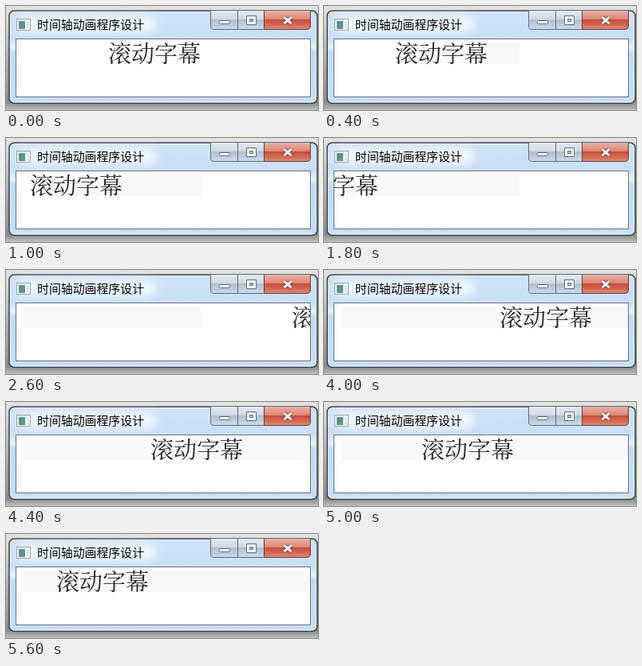
These frames come from a looping animation (391x131 px, 5.8 s). An HTML page:

```html
<!DOCTYPE html>
<html lang="zh-CN">
<head>
<meta charset="utf-8">
<style>
  html, body { margin: 0; width: 100%; height: 100%; overflow: hidden; background: #a9a9a9; }
  svg { display: block; width: 391px; height: 131px; }
  text { font-family: "Noto Sans CJK SC", "Noto Sans CJK", sans-serif; }
  #caption { font-family: "Noto Serif CJK SC", "Noto Sans CJK SC", "Noto Sans CJK", serif; font-weight: 200; }
</style>
</head>
<body>
<svg viewBox="0 0 391 131">
  <defs>
    <linearGradient id="shadow" x2="0" y2="1">
      <stop offset="0" stop-color="#e2e2e2"/>
      <stop offset=".3" stop-color="#c6c6c6"/>
      <stop offset=".93" stop-color="#8a8a8a"/>
      <stop offset="1" stop-color="#c0c0c0"/>
    </linearGradient>
    <linearGradient id="glass" x2="0" y2="1">
      <stop offset="0" stop-color="#cfe2f8"/>
      <stop offset=".3" stop-color="#c9dff8"/>
      <stop offset=".4" stop-color="#e6f1fc"/>
      <stop offset=".45" stop-color="#c2dcf8"/>
      <stop offset="1" stop-color="#c8e0fa"/>
    </linearGradient>
    <linearGradient id="button" x2="0" y2="1">
      <stop offset="0" stop-color="#e4ebf3"/>
      <stop offset=".45" stop-color="#ced8e4"/>
      <stop offset=".48" stop-color="#b0bfd0"/>
      <stop offset="1" stop-color="#cbdbec"/>
    </linearGradient>
    <linearGradient id="close" x2="0" y2="1">
      <stop offset="0" stop-color="#ecb3a8"/>
      <stop offset=".45" stop-color="#dc8473"/>
      <stop offset=".48" stop-color="#c64a35"/>
      <stop offset="1" stop-color="#dc8a74"/>
    </linearGradient>
    <linearGradient id="teal" x2="1" y2="1">
      <stop offset="0" stop-color="#5486a0"/>
      <stop offset="1" stop-color="#5fa085"/>
    </linearGradient>
    <filter id="soft" x="-20%" y="-60%" width="140%" height="220%"><feGaussianBlur stdDeviation="6"/></filter>
    <clipPath id="client"><path d="M13 42H381V114H13Z"/></clipPath>
  </defs>

  <rect width="391" height="131" fill="url(#shadow)"/>
  <rect x="4" y="6" width="386" height="116.5" rx="6.5" fill="url(#glass)" stroke="#36424e" stroke-width="1.5"/>
  <rect x="5.5" y="7.5" width="383" height="113.5" rx="5" fill="none" stroke="#f3f9ff" stroke-opacity=".85"/>
  <rect x="14" y="13" width="174" height="20" rx="8" fill="#fff" opacity=".75" filter="url(#soft)"/>

  <rect x="13.5" y="16.5" width="17" height="14" fill="#f4f6f7" stroke="#98a2a8"/>
  <rect x="16" y="19" width="8" height="10" fill="url(#teal)"/>
  <path d="M26 20.5H29M26 23.5H29M26 26.5H29" stroke="#c5ced2"/>
  <text x="39" y="28.5" font-size="14.9" fill="#000">时间轴动画程序设计</text>

  <g stroke="#5d6977">
    <path d="M256.5 6V25Q256.5 29.5 261 29.5H290.5V6" fill="url(#button)"/>
    <path d="M290.5 6V29.5H323.5V6" fill="url(#button)"/>
    <path d="M323.5 6V29.5H377Q381.5 29.5 381.5 25V6" fill="url(#close)" stroke="#633a36"/>
  </g>
  <g fill="#fff" stroke="#5d6773">
    <rect x="267.5" y="18.5" width="13" height="4" rx="1"/>
    <path fill-rule="evenodd" d="M301.5 12.5H313.5V23.5H301.5ZM305.5 16.5H309.5V19.5H305.5Z"/>
  </g>
  <g fill="none">
    <path d="M348.5 14L357.5 22M357.5 14L348.5 22" stroke="#6e4a4a" stroke-width="5"/>
    <path d="M348.5 14L357.5 22M357.5 14L348.5 22" stroke="#fff" stroke-width="3"/>
  </g>

  <rect x="12.5" y="41.5" width="369" height="73" fill="#fff" stroke="#68737e"/>
  <g clip-path="url(#client)">
    <g fill="#f9f9f9">
      <rect id="leftTrail" y="46" height="27"/>
      <rect id="rightTrail" y="46" height="27"/>
    </g>
    <text id="caption" y="71" font-size="29" fill="#262626">滚动字幕</text>
  </g>
</svg>
<script>
  const TICK = 200, TICKS = 29, WRAP = 12;
  const caption = document.getElementById("caption");
  const leftTrail = document.getElementById("leftTrail");
  const rightTrail = document.getElementById("rightTrail");

  function span(rect, from, to) {
    rect.setAttribute("x", from);
    rect.setAttribute("width", Math.max(0, to - from));
  }

  function captionX(tick) {
    return Math.round(tick < WRAP ? 129 - 19.6 * tick : 379 - 19.7 * (tick - WRAP));
  }

  function render(ms) {
    const tick = Math.floor(ms / TICK) % TICKS;
    const x = captionX(tick);
    caption.setAttribute("x", x - 1);
    // The caption leaves a faint tint over the area it has crossed.
    span(leftTrail, tick < WRAP ? Math.max(22, x) : 22, tick ? 245 : 0);
    span(rightTrail, x, tick < WRAP ? 0 : 381);
  }

  const start = performance.now();
  function loop() {
    render(performance.now() - start);
    requestAnimationFrame(loop);
  }
  render(0);
  requestAnimationFrame(loop);
</script>
</body>
</html>
```
